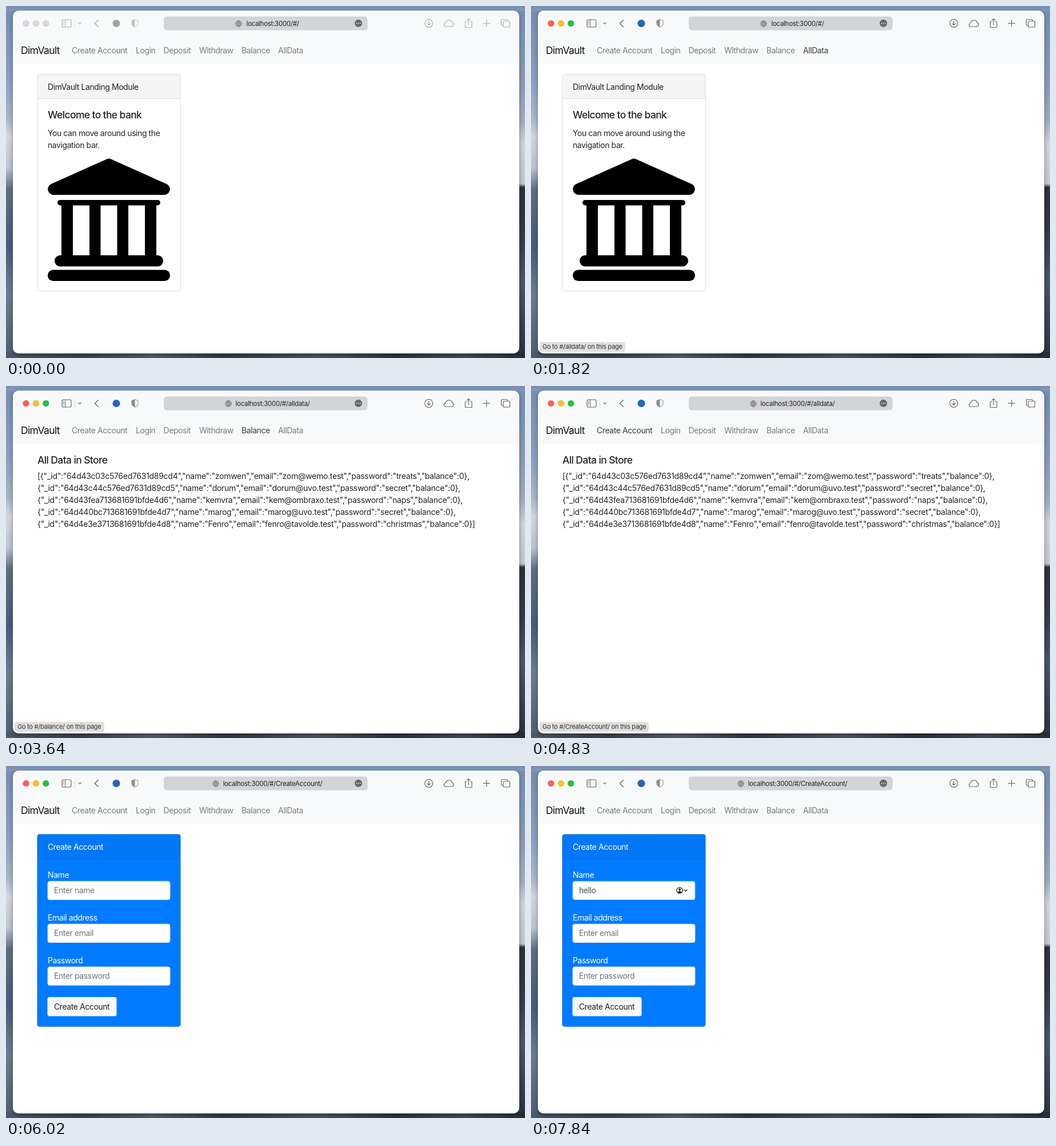
These frames come from a looping animation (908x617 px, 8000 ms). An HTML page:

```html
<!DOCTYPE html>
<html lang="en">
<head>
<meta charset="utf-8">
<title>Bank demo</title>
<style>
  html, body { margin: 0; width: 100%; height: 100%; overflow: hidden; }
  body {
    position: relative;
    font: 14px Inter, "Open Sans", sans-serif;
    background:
      linear-gradient(#7590b4, #8399b6) 0 0 / 100% 9px no-repeat,
      linear-gradient(90deg, #4d5a6c, #38424f 15%, #566170 28%, #303945 42%, #4d5765 60%, #2b343f 75%, #424c5a 88%, #262d37) 0 100% / 100% 10px no-repeat,
      linear-gradient(#748eb2, #8ba0bd 20%, #a9b7ca 32%, #d3d7de 37%, #bdc5d1 46%, #5f6f86 52%, #4b5d77 68%, #6b7c93 82%, #505e71) 0 0 / 50% 100% no-repeat,
      linear-gradient(#748eb2, #8b9db7 22%, #a4b0c2 33%, #d2d5da 39%, #c5cad1 50.5%, #2c323e 51.5%, #343c4a 65%, #4b566a 78%, #2b333f) 100% 0 / 50% 100% no-repeat;
  }
  #window {
    position: absolute; left: 12px; top: 8px; width: 886px; height: 601px;
    border-radius: 10px; box-shadow: 0 0 1px #0009, 0 3px 9px #0005;
    background: linear-gradient(#f8f9fb 93px, #fff 93px);
  }
  svg { position: absolute; left: 0; top: 0; }
  text { letter-spacing: -.03em; fill: #212529; white-space: pre; }
  .big { font-size: 17.5px; letter-spacing: -.036em; }
  .mid { font-weight: 500; }
  .row { letter-spacing: -.02em; }
  #nav text { fill: #7b7c7d; }
  #nav text.on { fill: #3c3d3e; }
  #form text { fill: #fff; }
  #form .hint { fill: #6c757d; }
  #form .dark { fill: #212529; }
  #form .typed { fill: #495057; }
  .line { fill: none; stroke: #6b6b6e; stroke-width: 1.2; stroke-linecap: round; stroke-linejoin: round; }
  #url, #status { position: absolute; letter-spacing: -.024em; white-space: pre; }
  #url {
    left: 279px; top: 18px; width: 356px; height: 25px; font-size: 11.5px; color: #222;
    display: flex; align-items: center; justify-content: center; gap: 7px;
  }
  #url svg { position: static; }
  #status {
    left: 15px; top: 589px; height: 17px; padding: 0 5px; border-radius: 4px;
    font-size: 11px; line-height: 17px; color: #333; background: #dfdfdf;
  }
</style>
</head>
<body>
<div id="window"></div>
<svg width="908" height="617">
  <g fill="#d9d9db" stroke="#c8c8ca" stroke-width=".7">
    <circle cx="35" cy="30.5" r="5.2"/><circle cx="52.5" cy="30.5" r="5.2"/><circle cx="69.8" cy="30.5" r="5.2"/>
  </g>
  <circle cx="193" cy="30.5" r="6.5" fill="#a2a3a6"/>
  <g id="active">
    <circle cx="35" cy="30.5" r="5.6" fill="#fe5f57"/>
    <circle cx="52.5" cy="30.5" r="5.6" fill="#febc2e"/>
    <circle cx="69.8" cy="30.5" r="5.6" fill="#28c13f"/>
    <circle cx="193" cy="30.5" r="6.5" fill="#2468b4"/>
  </g>

  <g id="icons" class="line">
    <rect x="98" y="24" width="16" height="13" rx="2.5"/>
    <path d="M103.8 24v13M100 27h1.6M100 29.5h1.6M100 32h1.6" stroke-width="1"/>
    <path d="M120.5 23v15" stroke="#dcdde0" stroke-width="1"/>
    <path d="M126.7 29.2l2.4 2.4 2.4-2.4"/>
    <path d="M161.3 24.7l-6 5.8 6 5.8" stroke-width="1.5"/>
    <path d="M225.5 23.5q-3 1.7-5.5 1.8v5.5q0 4 5.5 6.4 5.5-2.4 5.5-6.4v-5.5q-2.5-.1-5.5-1.8z" stroke="#a5a6a9"/>
    <path d="M225.5 23.5q-3 1.7-5.5 1.8v5.5q0 4 5.5 6.4z" fill="#8b8c8f" stroke="none"/>
    <circle cx="739.7" cy="30.3" r="7"/>
    <path d="M739.7 26.5v7M737 31l2.7 2.7 2.7-2.7"/>
    <path d="M769.5 36h10.3a3.6 3.6 0 0 0 .5-7.1 5.3 5.3 0 0 0-10-1 3.2 3.2 0 0 0-2.4 3 2.7 2.7 0 0 0 1.6 5.1z"/>
    <path d="M806 27.5h-2.5v10h11.5v-10h-2.5M809.2 33v-10.5M806.5 25l2.7-2.7 2.7 2.7"/>
    <path d="M835 30.3h11.5M840.7 24.5v11.5"/>
    <rect x="866.5" y="23.5" width="11" height="10.5" rx="2"/>
    <rect x="870" y="26.5" width="11.5" height="10.5" rx="2" fill="#f8f9fb"/>
  </g>

  <rect x="276" y="18.5" width="356.5" height="24" rx="5" fill="#d3d4d6"/>
  <circle cx="616.5" cy="30.3" r="6.5" fill="#68696b"/>
  <path d="M613.3 30.3h0M616.5 30.3h0M619.7 30.3h0" stroke="#eee" stroke-width="1.8" stroke-linecap="round"/>

  <text class="big" x="26" y="84" style="fill:#111">DimVault</text>
  <g id="nav"></g>

  <g id="home">
    <rect x="55" y="120" width="250" height="42" fill="#f5f5f5"/>
    <path d="M55 162.5h250" stroke="#dcdcdc"/>
    <rect x="54.9" y="120" width="250.2" height="379.5" rx="3.5" fill="none" stroke="#dcdcdc"/>
    <text x="73" y="146.5">DimVault Landing Module</text>
    <text class="big mid" x="73" y="197">Welcome to the bank</text>
    <text x="73" y="227.5">You can move around using the</text>
    <text x="73" y="248.5">navigation bar.</text>
    <path d="M176 268.5Q180 266.5 184 268.5L281 312A10 10 0 0 1 277.5 331H82.5A10 10 0 0 1 79 312Z"/>
    <rect x="90" y="340" width="180" height="9.5" rx="4.7"/>
    <path d="M97 348h20v90h-20zM146 348h19.5v90h-19.5zM194.5 348h19.5v90h-19.5zM243 348h20v90h-20z"/>
    <rect x="85" y="437" width="190" height="19.5" rx="9.7"/>
    <rect x="73" y="462.5" width="214" height="19.5" rx="9.7"/>
  </g>

  <g id="data"><text class="big mid" x="55" y="136">All Data in Store</text></g>

  <g id="form">
    <rect x="55" y="120" width="250" height="336" rx="3.5" fill="#007bff"/>
    <path d="M55 162v-38.5q0-3.5 3.5-3.5h243q3.5 0 3.5 3.5v38.5z" fill="#0077f7"/>
    <path d="M55 162.5h250" stroke="#006cdf"/>
    <rect x="55" y="120" width="250" height="336.5" rx="3.5" fill="none" stroke="#006cdf"/>
    <text x="73" y="146.5">Create Account</text>
    <g id="fields"></g>
    <rect x="72.5" y="405" width="121" height="33.5" rx="3.5" fill="#f8f9fa"/>
    <text class="dark" x="84" y="427">Create Account</text>
    <g id="focus">
      <g class="line" style="stroke:#111">
        <circle cx="260" cy="218" r="5.2"/>
        <path d="M268 216.8l2.7 2.6 2.7-2.6"/>
      </g>
      <circle cx="260" cy="216.5" r="1.9"/>
      <path d="M256.5 221.3q3.5-4 7 0-3.5 3.2-7 0z"/>
      <rect id="caret" y="210" width="1" height="16"/>
    </g>
  </g>
</svg>
<div id="url">
  <svg width="12" height="12" class="line" style="stroke-width:.8">
    <circle cx="6" cy="6" r="5.2"/><ellipse cx="6" cy="6" rx="2.4" ry="5.2"/>
    <path d="M6 .8v10.4M.8 6h10.4M1.7 3.3h8.6M1.7 8.7h8.6"/>
  </svg>
  <span id="address"></span>
</div>
<div id="status"></div>

<script>
const $ = id => document.getElementById(id);
const setText = (el, s) => { if (el.textContent !== s) el.textContent = s; };
const show = (id, on) => { $(id).style.display = on ? "" : "none"; };
const clamp = v => Math.max(0, Math.min(1, v));

const links = [
  ["Create Account", 115, "CreateAccount"], ["Login", 227, "login"],
  ["Deposit", 275.5, "deposit"], ["Withdraw", 338, "withdraw"],
  ["Balance", 412, "balance"], ["AllData", 476, "alldata"]
];
$("nav").innerHTML = links.map(([label, x]) => `<text x="${x}" y="83">${label}</text>`).join("");

const users = [
  ["64d43c03c576ed7631d89cd4", "zomwen", "zom@wemo.test", "treats"],
  ["64d43c44c576ed7631d89cd5", "dorum", "dorum@uvo.test", "secret"],
  ["64d43fea713681691bfde4d6", "kemvra", "kem@ombraxo.test", "naps"],
  ["64d440bc713681691bfde4d7", "marog", "marog@uvo.test", "secret"],
  ["64d4e3e3713681691bfde4d8", "Fenro", "fenro@tavolde.test", "christmas"]
].map(([_id, name, email, password]) => ({ _id, name, email, password, balance: 0 }));
$("data").innerHTML += JSON.stringify(users).replace(/},/g, "},\n").split("\n")
  .map((row, i) => `<text class="row" x="55" y="${163 + 21 * i}">${row}</text>`).join("");

$("fields").innerHTML = ["Name", "Email address", "Password"].map((label, i) => {
  const y = 75 * i, hint = "Enter " + label.split(" ")[0].toLowerCase();
  return `<text x="73" y="${196 + y}">${label}</text>
    <rect x="73" y="${202 + y}" width="214" height="32.5" rx="3.5" fill="#fff" stroke="#ced4da"/>
    <text class="hint" x="84" y="${223 + y}">${hint}</text>`;
}).join("");
const nameBox = $("fields").querySelector("rect");
const nameText = $("fields").querySelector(".hint");

// [start time, hovered link], -1 for none
const hovers = [[0, -1], [1190, 0], [1330, 1], [1470, 2], [1540, 3], [1610, 4],
  [1820, 5], [3640, 4], [3710, -1], [4130, 0], [5600, -1]];
const keys = [6650, 6790, 7000, 7140, 7280];

const rise = d => d < 0 ? 0 : clamp(.4 + d / 350);
const fall = d => clamp(.75 - d / 280);
const statusAlpha = t =>
  t < 3920 ? rise(t - 1190) : t < 4130 ? fall(t - 3920) :
  t < 5810 ? rise(t - 4130) : fall(t - 5810);

function draw(t) {
  const active = t < 350 ? 0 : t < 420 ? .5 : 1;
  $("active").style.opacity = active;
  $("icons").style.opacity = .5 + active / 2;

  const past = hovers.filter(h => t >= h[0]).map(h => h[1]);
  const hover = past[past.length - 1];
  [...$("nav").children].forEach((el, i) => el.classList.toggle("on", i === hover));

  const last = past.filter(i => i >= 0).pop();
  setText($("status"), last === undefined ? "" : `Go to #/${links[last][2]}/ on this page`);
  $("status").style.opacity = statusAlpha(t);

  show("home", t < 2520);
  show("data", t >= 2520 && t < 5250);
  show("form", t >= 5250);
  setText($("address"), "localhost:3000/#/" + (t < 2520 ? "" : t < 5320 ? "alldata/" : "CreateAccount/"));

  const typed = "hello".slice(0, keys.filter(k => t >= k).length);
  setText(nameText, typed || "Enter name");
  nameText.setAttribute("class", typed ? "typed" : "hint");
  const k = clamp((t - 6090) / 150), mix = (a, b) => a + (b - a) * k;
  nameBox.setAttribute("stroke", `rgb(${mix(206, 128)},${mix(212, 189)},${mix(218, 255)})`);
  show("focus", t >= 6090);
  show("caret", t < 7840);
  $("caret").setAttribute("x", 84 + (typed ? nameText.getComputedTextLength() : 0));
}

const start = performance.now();
function tick() {
  const t = (performance.now() - start) % 8000;
  draw(Math.floor(t / 70) * 70);
  requestAnimationFrame(tick);
}
tick();
</script>
</body>
</html>
```
